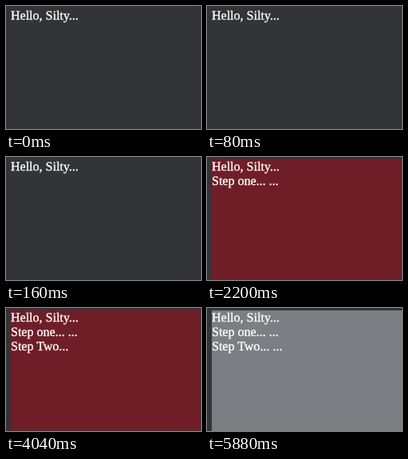
Write an HTML page that moves like this. It is 244 px wide and 154 px high and loops after 6520 ms.

```html
<!DOCTYPE html>
<html lang="en">
<head>
<meta charset="utf-8">
<title>Step log</title>
<style>
  html, body { margin: 0; width: 100%; height: 100%; overflow: hidden; background: #333437; }
  svg { display: block; width: 244px; height: 154px; }
  text {
    font: 16px "Liberation Serif", Times, serif;
    fill: #fff;
    stroke: #fff;
    stroke-width: 0.35px;
    text-rendering: geometricPrecision;
    white-space: pre;
  }
</style>
</head>
<body>
<svg viewBox="0 0 244 154">
  <rect width="244" height="154" fill="#333437"/>
  <rect id="panel" x="6" y="3" width="238" height="151"/>
  <text x="6" y="17"></text>
  <text x="6" y="35"></text>
  <text x="6" y="53"></text>
</svg>
<script>
  const LOOP = 6520;
  const RED = '#6f1e27';
  const GRAY = '#7b7f83';
  const GREETING = 'Hello, Silty...';

  const states = [
    { at: 0, fill: 'none', lines: [GREETING] },
    { at: 360, fill: 'none', lines: [GREETING, 'Step one...'] },
    { at: 2200, fill: RED, lines: [GREETING, 'Step one... ...'] },
    { at: 4040, fill: RED, lines: [GREETING, 'Step one... ...', 'Step Two...'] },
    { at: 5880, fill: GRAY, lines: [GREETING, 'Step one... ...', 'Step Two... ...'] }
  ];

  const panel = document.getElementById('panel');
  const rows = document.querySelectorAll('text');
  let shown = null;

  function render(time) {
    const state = states.filter(s => s.at <= time).pop();
    if (state === shown) return;
    shown = state;
    panel.setAttribute('fill', state.fill);
    rows.forEach((row, i) => { row.textContent = state.lines[i] || ''; });
  }

  const start = performance.now();
  function tick() {
    render((performance.now() - start) % LOOP);
    requestAnimationFrame(tick);
  }
  tick();
</script>
</body>
</html>
```
